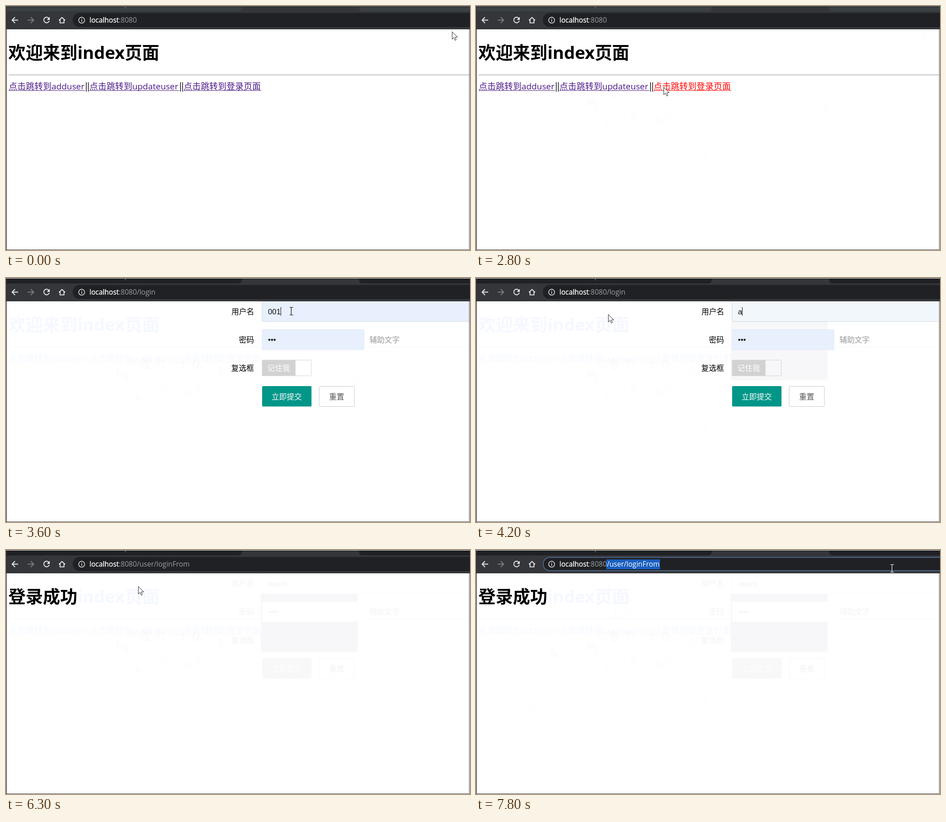
An HTML page that plays this animation: 1029x544 px, repeating every 8000 ms.

```html
<!DOCTYPE html>
<html lang="zh">
<head>
<meta charset="utf-8">
<title>Login demo</title>
<style>
html, body { margin: 0; width: 100%; height: 100%; overflow: hidden; background: #fff; }
svg { display: block; width: 100vw; height: 100vh; }
text { font-family: "Open Sans", "Noto Sans CJK SC", "Noto Sans CJK", sans-serif; white-space: pre; }
.h1 { font-size: 38.3px; font-weight: 700; }
.link { font-size: 19px; fill: #4b1a86; }
.url { font-size: 15.6px; }
.form { font-size: 16.8px; }
.field { font-family: "Liberation Sans", Arial, sans-serif; font-size: 16.8px; }
.ghost text { fill: #f5f8ff; }
.ghost line { stroke: #fafbfe; }
.faded text { fill: #f3f3f4; }
.trail path { fill: none; stroke: #000; stroke-opacity: .022; }
</style>
</head>
<body>
<svg id="stage" viewBox="0 0 1029 544" preserveAspectRatio="none"></svg>
<script>
const LOOP = 8000;
const USER = 'agent';
const ACTIVE = 2900, LOGIN = 3000, DONE = 6000;

const text = (x, y, cls, str, extra = '') =>
  `<text x="${x}" y="${y}" class="${cls}" ${extra}>${str}</text>`;
const rect = (x, y, w, h, fill, extra = '') =>
  `<rect x="${x}" y="${y}" width="${w}" height="${h}" fill="${fill}" ${extra}/>`;
const line = (x1, y1, x2, y2, color, w = 1) =>
  `<line x1="${x1}" y1="${y1}" x2="${x2}" y2="${y2}" stroke="${color}" stroke-width="${w}"/>`;
const link = (x, end, str, id) => `<g id="${id}">` +
  text(x, 186, 'link', str) + line(x, 188.5, end, 188.5, '#4b1a86', 1.2) + '</g>';

const indexPage = prefix =>
  text(5.2, 118, 'h1', '欢迎来到index页面') +
  line(6, 153.5, 1027, 153.5, '#9c9c9c') + line(6, 154.5, 1027, 154.5, '#eee') +
  link(6, 175, '点击跳转到adduser', prefix + 'Add') +
  link(185, 384, '点击跳转到updateuser', prefix + 'Update') +
  link(394, 566, '点击跳转到登录页面', prefix + 'Login') +
  [178, 182.6, 387, 391.6].map(x => line(x, 170, x, 191, '#111', 1.5)).join('');

const labels =
  text(500, 80.5, 'form', '用户名') + text(516.4, 143.5, 'form', '密码') +
  text(499.6, 206.5, 'form', '复选框') + text(806, 143.5, 'form', '辅助文字', 'fill="#999"');

const formPage =
  rect(568, 40, 480, 57, '#e8f0fe', 'id="userBox" stroke="#cfd3da" rx="2"') +
  rect(568, 115, 226, 45, '#e8f0fe', 'id="passBox" stroke="#e3e8f1" rx="2"') +
  labels +
  rect(568, 183, 109, 35, 'none', 'stroke="#d2d2d2" rx="2"') +
  rect(568, 183, 74, 35, '#d2d2d2') + text(579.6, 206.5, 'form', '记住我', 'fill="#fff"') +
  rect(568, 241, 109.5, 45.5, '#009688', 'rx="2"') + text(589, 270.5, 'form', '立即提交', 'fill="#fff"') +
  rect(694.5, 241.5, 78, 45, '#fff', 'stroke="#c9c9c9" rx="2"') +
  text(716.4, 270.5, 'form', '重置', 'fill="#555"') +
  rect(581, 66, 28, 19, '#1967d2', 'id="userSel"') + rect(581, 128, 18, 19, '#1967d2', 'id="passSel"') +
  text(581, 80.5, 'field', '', 'id="user"') + text(581, 143, 'field', '', 'id="pass"') +
  rect(0, 0, 1, 19, '#000', 'id="caret"') +
  rect(565, 97, 215, 131, '#292a2d', 'id="panel" rx="5"');

const residue = rect(565, 97, 215, 131, '#f7f7fa', 'rx="5"');

const fadedForm =
  rect(568, 52, 459, 45, '#fff') + labels +
  line(567.5, 52, 567.5, 97, '#fafafa') + line(568, 97.5, 1027, 97.5, '#fafafa') +
  text(581, 80.5, 'field', USER) +
  rect(568, 115, 227, 45, '#fff') + text(581, 143, 'field', '••••') +
  rect(568, 241, 109.5, 45.5, '#f8f8f8') +
  text(589, 270.5, 'form', '立即提交', 'style="fill:#fdfdfd"') +
  rect(694.5, 241.5, 78, 45, 'none', 'stroke="#f8f8f8"') + text(716.4, 270.5, 'form', '重置') +
  rect(3, 53, 156, 94, '#fff');

const stroke = (d, color, w = 1.9) => `<path d="${d}" fill="none" stroke="${color}" stroke-width="${w}"/>`;
const chrome =
  rect(0, 1, 1029, 51, '#35363a') +
  '<path id="tabs" d="M0 1H523V4Q523 12 515 12H0ZM783 1H1029V12H791Q783 12 783 4Z"/>' +
  rect(264, 2, 1.5, 3, '#85888b') + rect(0, 1, 1029, 1, '#15171a') +
  rect(0, 0, 1029, 1, '#fff', 'id="topEdge"') +
  rect(149, 16.5, 920, 29.5, '#202124', 'id="omni" rx="14.75" stroke-width="2"') +
  stroke('M27 31.5H14M20 25L13.6 31.5L20 38', '#eceef0') +
  stroke('M48 31.5H61M55 25L61.4 31.5L55 38', '#7b7d80') +
  stroke('M95 27.5A6.2 6.2 0 1 0 96 33', '#eceef0') + '<path d="M97 24.5V31H90.5Z" fill="#eceef0"/>' +
  stroke('M117.5 32L124.2 25.5L131 32M119.8 30.5V37.6H128.6V30.5', '#eceef0') +
  '<circle cx="167.8" cy="31.7" r="6.6" fill="none" stroke="#e2e4e6" stroke-width="1.5"/>' +
  rect(167, 30.6, 1.6, 4.6, '#e2e4e6') + rect(167, 27.9, 1.6, 1.6, '#e2e4e6') +
  rect(289, 21, 119, 22, '#1a5fc0', 'id="urlSel"') +
  '<text x="185" y="37" class="url" fill="#fff"><tspan stroke="#fff" stroke-width=".3">localhost</tspan>' +
  '<tspan fill="#9aa0a6">:8080</tspan><tspan id="path"></tspan></text>' +
  line(1, 1, 1, 544, '#303030', 1.4) + line(1027.5, 52, 1027.5, 544, '#404040') +
  line(1, 543.5, 1028, 543.5, '#404040') + rect(1028, 52, 1, 492, '#fff');

// Cursor shapes; the origin is the hot spot, except for the hand's top-left corner.
const SHAPES = {
  arrow: 'M.5.5V17L4.3 13.4L7 19.6L9.6 18.5L7 12.4H12.4Z',
  hand: 'M5 13V2a1.7 1.7 0 0 1 3.4 0V9a1.6 1.6 0 0 1 3 .3a1.6 1.6 0 0 1 2.8 .8a1.4 1.4 0 0 1 2.6 .8V16c0 4-2 7-5 7.5h-3c-3 0-4.5-2-6-5L.7 14c-1-2 1-3 2.4-1.6L5 14.5',
  beam: 'M-4-8.5H-1L-.5-8L0-8.5H4M-.5-8V8M-4 8.5H-1L-.5 8L0 8.5H4'
};
// Time in units of 100 ms, position, shape.
const TRACK = [
  [0, 989, 57, 'arrow'], [1, 772, 212], [2, 499, 318], [3, 289, 258], [4, 247, 202],
  [5, 245, 203], [6, 260, 202], [7, 262, 218], [8, 345, 238], [9, 400, 245],
  [10, 420, 231], [11, 464, 176, 'hand'], [12, 335, 177], [13, 310, 178], [14, 298, 178], [15, 302, 178],
  [18, 296, 178], [19, 275, 178], [20, 267, 178], [21, 330, 178], [22, 376, 178],
  [24, 388, 178], [25, 410, 178], [28, 416, 181, 'arrow'],
  [30, 427, 187], [31, 474, 200], [33, 560, 130], [34, 620, 84, 'beam'], [35, 633, 74],
  [38, 293, 81, 'arrow'],
  [66, 308, 134], [67, 168, 220], [68, 120, 336], [69, 168, 220], [70, 331, 125],
  [71, 335, 98], [72, 322, 66], [73, 318, 34, 'beam'], [74, 292, 33], [77, 620, 38], [78, 923, 41]
];
let kind;
for (const step of TRACK) kind = step[3] = step[3] || kind;

const pointer = ([, x, y, shape]) =>
  `<path transform="translate(${x} ${y})" d="${SHAPES[shape]}"/>`;

const stage = document.getElementById('stage');
stage.innerHTML = rect(0, 0, 1029, 544, '#fff') +
  `<g id="oldIndex" class="ghost">${indexPage('old')}</g>` +
  `<g id="trail" class="trail">${TRACK.map(pointer).join('')}</g>` +
  `<g id="residue">${residue}</g><g id="oldForm" class="faded">${fadedForm}</g>` +
  `<g id="index">${indexPage('nav')}</g><g id="form">${formPage}</g>` +
  `<g id="done">${text(5.2, 118, 'h1', '登录成功')}</g>` +
  chrome + '<path id="cursor" stroke-linejoin="round"/>';

const $ = id => document.getElementById(id);
const show = (id, on) => $(id).setAttribute('display', on ? 'inline' : 'none');
const set = (id, attrs) => {
  for (const name in attrs) $(id).setAttribute(name, attrs[name]);
};
const write = (id, str) => {
  if ($(id).textContent !== str) $(id).textContent = str;
};
const passed = (t, times) => times.filter(at => t >= at).length;
const between = (t, from, to) => t >= from && t < to;
const trail = [...$('trail').children];

function drawForm(t) {
  const typed = passed(t, [4200, 4400, 4500, 4600, 4800]);
  const inPass = t >= 5100;
  const dots = t < 5200 ? 3 : passed(t, [5200, 5600, 5700, 5900]);
  const selected = between(t, 3700, 4200);
  const passSelected = between(t, 5100, 5200);
  write('user', typed ? USER.slice(0, typed) : '001');
  write('pass', '•'.repeat(dots));
  set('user', { fill: selected ? '#fff' : '#111' });
  set('pass', { fill: passSelected ? '#fff' : '#111' });
  set('userBox', { fill: typed ? '#f2f7fb' : '#e8f0fe' });
  set('passBox', { fill: t >= 5200 ? '#f4f8fc' : '#e8f0fe' });
  show('userSel', selected);
  show('passSel', passSelected);
  show('panel', selected);
  show('caret', t >= 3600 && !selected && !passSelected);
  set('caret', {
    x: 581 + Math.round($(inPass ? 'pass' : 'user').getComputedTextLength()),
    y: inPass ? 128 : 65
  });
}

function drawCursor(t) {
  const now = TRACK.filter(step => step[0] * 100 <= t).length - 1;
  const [, x, y, shape] = TRACK[now];
  const beam = shape === 'beam';
  set('cursor', {
    d: SHAPES[shape],
    transform: `translate(${x} ${y})`,
    fill: beam ? 'none' : '#fff',
    stroke: !beam ? '#222' : y < 52 ? '#fff' : '#000',
    'stroke-width': beam ? 1.2 : 1
  });
  trail.forEach((mark, i) => mark.setAttribute('display', i < now ? 'inline' : 'none'));
}

function draw(t) {
  const onForm = between(t, LOGIN, DONE);
  show('index', t < LOGIN);
  show('oldIndex', t >= LOGIN);
  show('form', onForm);
  show('residue', t >= 4200);
  show('oldForm', t >= DONE);
  show('done', t >= DONE);
  if (onForm) drawForm(t);

  const hot = t >= 2800 ? '#f00' : '#4b1a86';
  $('navLogin').firstChild.style.fill = hot;
  $('navLogin').lastChild.style.stroke = hot;

  const selected = t >= 7700;
  set('tabs', { fill: t < ACTIVE ? '#3c4143' : '#202124' });
  set('topEdge', { fill: t < ACTIVE ? '#888' : '#fff' });
  set('omni', { stroke: t >= 7600 ? '#4b648a' : '#202124' });
  show('urlSel', selected);
  write('path', t < LOGIN ? '' : t < DONE ? '/login' : '/user/loginFrom');
  set('path', { fill: selected ? '#fff' : '#9aa0a6' });
  drawCursor(t);
}

const start = performance.now();
function tick() {
  draw((performance.now() - start) % LOOP);
  requestAnimationFrame(tick);
}
tick();
</script>
</body>
</html>
```
